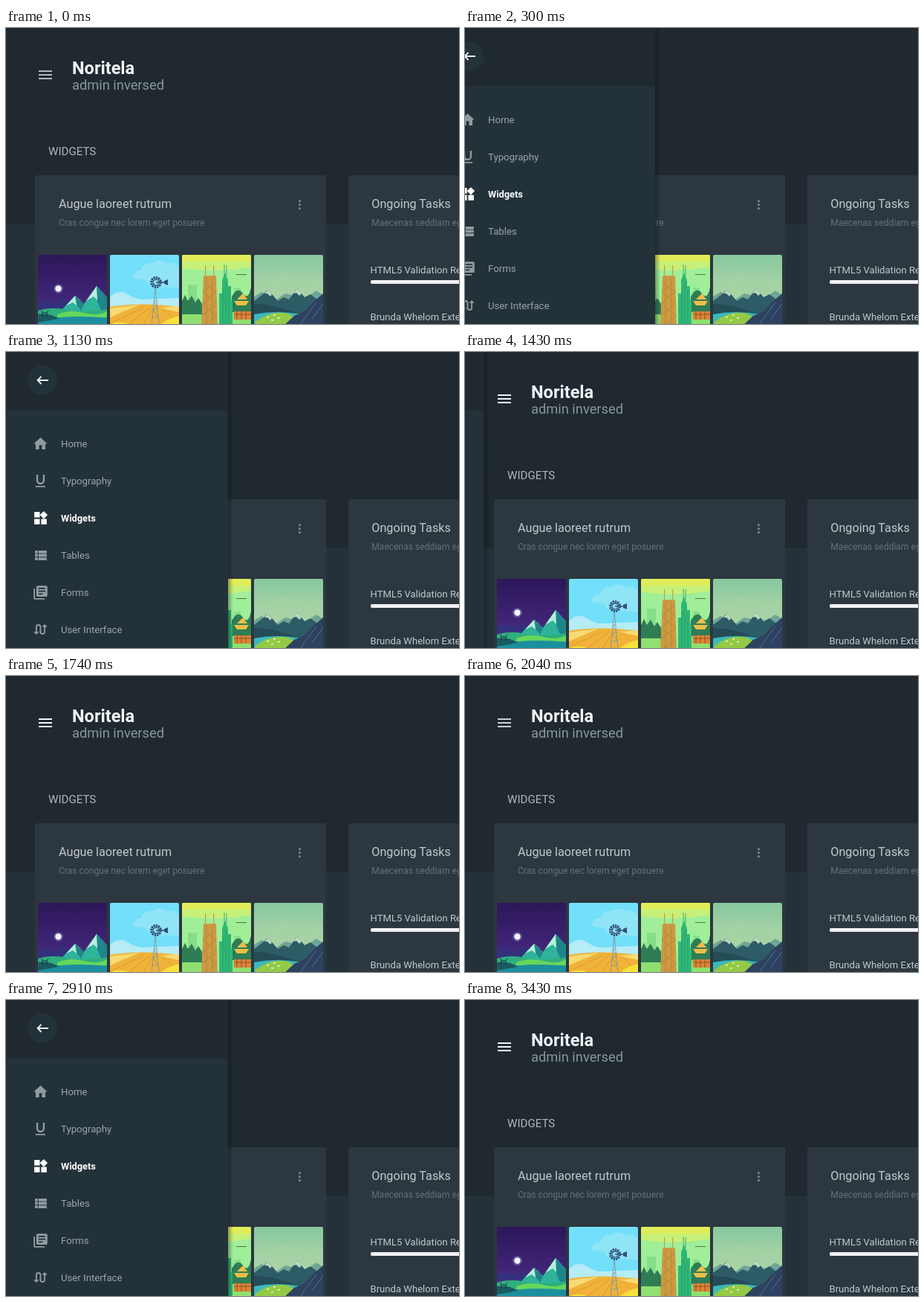
Recreate the animation shown at these times as an HTML page. Size 610 by 398 pixels, loop 3470 ms.

```html
<!DOCTYPE html>
<html lang="en">
<head>
<meta charset="utf-8">
<title>Sliding sidebar</title>
<style>
  html, body { margin: 0; width: 100%; height: 100%; overflow: hidden; background: #1f292f; }
  svg { display: block; }
  text { font-family: Roboto, sans-serif; fill: #c0c9ce; }
  .brand { font-size: 23.5px; font-weight: 700; fill: #f1f4f6; }
  .tag { font-size: 18.3px; fill: #89969d; }
  .section { font-size: 15.1px; fill: #aeb9be; }
  .title { font-size: 16.2px; }
  .sub { font-size: 12.1px; fill: #65727a; }
  .task { font-size: 13.1px; }
  .card { fill: #2c373f; }
  .item { fill: #8f9ca2; }
  .item text { font-size: 13.2px; fill: #9aa6ac; }
  .item.on, .item.on text { fill: #fff; }
  .item.on text { font-size: 12.8px; font-weight: 700; }
</style>
</head>
<body>
<svg width="610" height="398" viewBox="0 0 610 398">
  <defs>
    <clipPath id="tile"><rect width="93" height="100" rx="2"/></clipPath>
    <linearGradient id="night" x2="0" y2="1">
      <stop stop-color="#2c1759"/><stop offset=".55" stop-color="#3f2475"/><stop offset="1" stop-color="#5d3c8e"/>
    </linearGradient>
    <linearGradient id="dusk" x2="0" y2="1">
      <stop stop-color="#86c99f"/><stop offset=".6" stop-color="#b5d5a6"/>
    </linearGradient>
    <linearGradient id="shade">
      <stop stop-color="#0b1114" stop-opacity=".36"/><stop offset="1" stop-color="#0b1114" stop-opacity="0"/>
    </linearGradient>
  </defs>

  <rect width="610" height="398" fill="#1f292f"/>
  <rect y="263" width="610" height="135" fill="#243138"/>

  <path id="burger" transform="translate(41 51)" fill="#f3f6f7" d="M3 6h18v2H3zM3 11h18v2H3zM3 16h18v2H3z"/>
  <text class="brand" x="89" y="62">Noritela</text>
  <text class="tag" x="89" y="83">admin inversed</text>
  <text class="section" x="57" y="171">WIDGETS</text>

  <rect class="card" x="39" y="198" width="392" height="210" rx="2"/>
  <text class="title" x="71" y="242">Augue laoreet rutrum</text>
  <text class="sub" x="71" y="266">Cras congue nec lorem eget posuere</text>
  <g fill="#78848a">
    <circle cx="395.5" cy="232.7" r="1.6"/><circle cx="395.5" cy="237.7" r="1.6"/><circle cx="395.5" cy="242.7" r="1.6"/>
  </g>

  <!-- night mountains -->
  <g transform="translate(43 305)" clip-path="url(#tile)">
    <rect width="93" height="100" fill="url(#night)"/>
    <circle cx="27.5" cy="45.5" r="6.5" fill="#a99be0" opacity=".35"/>
    <circle cx="27.5" cy="45.5" r="4.2" fill="#eef6ff"/>
    <path fill="#35307e" d="M0 66L12 60 22 66 34 58 52 74H0z"/>
    <path fill="#2fb39a" d="M30 76L50 55 62 66 79 42 93 57V80H30z"/>
    <path fill="#b4f0d8" d="M50 55L38 68 47 64 52 68 57 61zM79 42L65 62 75 56 81 62 87 51z"/>
    <path fill="#1f8589" d="M79 42L93 57V78H86L80 62zM50 55L62 66 58 75 52 67z"/>
    <path fill="#2fae7c" d="M0 75Q18 69 38 74T93 73V90H0z"/>
    <path fill="#67d65c" d="M26 80Q44 73 62 78T93 76V84H26z"/>
    <path fill="#1c8f9e" d="M0 88Q44 80 93 85V100H0z"/>
    <path fill="#1a5a60" d="M0 80Q16 78 28 86L0 91z"/>
    <path stroke="#152e45" fill="none" d="M6 83V78H12V83M12 78L14 75M6 78L5 75"/>
  </g>

  <!-- windmill -->
  <g transform="translate(140 305)" clip-path="url(#tile)">
    <rect width="93" height="100" fill="#72dffb"/>
    <path fill="#a4e8f4" d="M30 31Q32 20 42 21 45 9 58 11 66 4 76 11 86 9 93 16V44H70Q50 44 48 34z" opacity=".6"/>
    <path fill="#b5ecf6" d="M0 57Q12 45 24 53T46 60L93 58V76H0z"/>
    <path fill="#f0b238" d="M0 70Q40 63 93 70V100H0z"/>
    <path fill="#f8da72" d="M0 72L40 67 0 84zM93 69L66 71 93 77z"/>
    <path stroke="#d9942e" stroke-width=".8" fill="none" d="M0 92L45 71M16 100L54 71M40 100L60 71M93 94L70 71"/>
    <path fill="#f6e03a" d="M62 100Q74 86 93 82V100zM0 93Q20 86 36 100H0z"/>
    <g stroke="#7f989c" stroke-width=".9" fill="none">
      <path d="M56 94L61 44 66 94M57 84H65M58 73L65 84M59 62L64 73M59 62H63M58 73H64"/>
    </g>
    <g stroke="#31517c" fill="none">
      <circle cx="62" cy="37" r="5.5" stroke-width="5" stroke-dasharray="2 .8"/>
      <path d="M62 37H75" stroke-width="1.5"/>
    </g>
    <path fill="#31517c" d="M73 35L78 33V41L73 39z"/>
  </g>

  <!-- city towers -->
  <g transform="translate(237 305)" clip-path="url(#tile)">
    <rect width="93" height="100" fill="#a0ef98"/>
    <path fill="#e0ec58" d="M0 0H93V9H0z"/>
    <path fill="#c6f078" d="M0 9H93V16Q50 24 0 18z"/>
    <path fill="#84e088" d="M8 40H20V100H8zM70 44H79V70H70z"/>
    <path fill="#2f7d55" d="M0 62L4 54 8 62 13 55 18 64 22 58 27 66V100H0zM67 56Q75 42 82 52T93 44V78H67z"/>
    <path fill="#8fe070" d="M0 80H27V100H0zM67 77H93V100H67z"/>
    <path fill="#cc9a42" d="M29 28H46L48 100H26zM31 14H32.2V29H31zM42 14H43.2V29H42z"/>
    <path stroke="#b07f38" stroke-width=".7" fill="none" d="M29 36L46 50 27 66 47 82 27 96M46 36L28 50 47 66 26 82M33 30V100M41 30V100"/>
    <path fill="#2fb877" d="M54 34L58 24 62 34V42H66V60H68V100H50V52H54z"/>
    <path stroke="#27996a" stroke-width=".8" fill="none" d="M57 13V28M60 14V28M55 44V100M59 38V100M63 46V100"/>
    <path stroke="#56703f" fill="none" d="M73 26.5H87"/>
    <path fill="#f0bd48" d="M74 60L82 52 88 60zM70 62H90L86 68H74z"/>
    <path fill="#dc8535" d="M70 76H93V87H70z"/>
    <path stroke="#904f2f" fill="none" d="M70 80H93M74 76V87M80 76V87M86 76V87"/>
  </g>

  <!-- lake valley -->
  <g transform="translate(334 305)" clip-path="url(#tile)">
    <rect width="93" height="100" fill="url(#dusk)"/>
    <path fill="#a3d3a5" d="M0 36Q12 26 24 32 34 18 48 27 60 20 68 32L93 27V56H0z" opacity=".65"/>
    <path fill="#6fa596" d="M0 56L10 50 30 60 42 52 70 58 84 48 93 54V80H0z"/>
    <path fill="#2e5c66" d="M0 62L8 56 19 47 32 62 40 57 47 60 58 45 68 57 76 53 93 66V84H0z"/>
    <path fill="#b9d8c2" d="M19 47L14 52 18 52 22 56 24 53zM58 45L53 52 57 51 61 55 64 52z"/>
    <path fill="#244c57" d="M0 66Q25 66 56 78V85H0z"/>
    <path fill="#3eb7bb" d="M0 80Q30 74 64 80V100H0z"/>
    <path fill="#93ca45" d="M2 90Q20 76 40 78T54 100H0z"/>
    <path fill="#f0f6d5" d="M17 83h3v1.5h-3zM26 80h3v1.5h-3zM32 84h3v1.5h-3zM23 87h3v1.5h-3z"/>
    <path fill="#2d4260" d="M93 52L79 64 68 76 54 82 38 97V100H93z"/>
    <path stroke="#557087" fill="none" d="M84 64L66 88 60 100M93 66L78 86"/>
  </g>

  <rect class="card" x="461" y="198" width="160" height="210" rx="2"/>
  <text class="title" x="492.3" y="242">Ongoing Tasks</text>
  <text class="sub" x="492.3" y="266">Maecenas seddiam eget</text>
  <text class="task" x="490.5" y="330">HTML5 Validation Report</text>
  <rect x="491" y="339" width="140" height="5" rx="2" fill="#f1eef5"/>
  <text class="task" x="490.5" y="393">Brunda Whelom Extension</text>

  <g id="drawer">
    <rect x="299" width="7" height="398" fill="url(#shade)"/>
    <rect x="-20" width="319" height="398" fill="#1f292f"/>
    <path fill="#233138" d="M-20 78H297Q299 78 299 80V398H-20z"/>
    <circle cx="49" cy="38" r="20" fill="#233138"/>
    <path d="M57 38H43M47.5 33L42.5 38 47.5 43" fill="none" stroke="#eef2f3" stroke-width="1.8"/>
    <g id="menu"></g>
  </g>
</svg>
<script>
const LOOP = 3470, SLIDE = 300, HIDDEN = -315;

const items = [
  ["Home", "M10 20v-6h4v6h5v-8h3L12 3 2 12h3v8z"],
  ["Typography", "M12 17c3.3 0 6-2.7 6-6V3h-2.5v8a3.5 3.5 0 0 1-7 0V3H6v8c0 3.3 2.7 6 6 6zm-7 2v2h14v-2z"],
  ["Widgets", "M13 13v8h8v-8zM3 21h8v-8H3zM3 3v8h8V3zm13.7-1.3L11 7.3l5.7 5.7 5.6-5.7z"],
  ["Tables", "M4 14h4v-4H4zm0 5h4v-4H4zM4 9h4V5H4zm5 5h12v-4H9zm0 5h12v-4H9zM9 5v4h12V5z"],
  ["Forms", "M4 6H2v14c0 1.1.9 2 2 2h14v-2H4zm16-4H8c-1.1 0-2 .9-2 2v12c0 1.1.9 2 2 2h12c1.1 0 2-.9 2-2V4c0-1.1-.9-2-2-2zm-1 9H9V9h10zm-4 4H9v-2h6zm4-8H9V5h10z"],
  ["User Interface", "M18 4l-4 4h3v7a2 2 0 0 1-4 0V8a4 4 0 0 0-8 0v7H2l4 4 4-4H7V8a2 2 0 0 1 4 0v7a4 4 0 0 0 8 0V8h3z"]
];

document.getElementById("menu").innerHTML = items.map(([label, icon], i) => `
  <g class="item${label === "Widgets" ? " on" : ""}" transform="translate(0 ${123.5 + i * 50})">
    <path transform="translate(35.3 -11.2) scale(.93)" d="${icon}"/>
    <text x="74" y="4.5">${label}</text>
  </g>`).join("");

// steps: [time, value, easing to the next step]
function play(id, prop, steps) {
  const frames = steps.map(([time, value, easing = "linear"]) =>
    ({ offset: time / LOOP, [prop]: value, easing }));
  document.getElementById(id).animate(frames, { duration: LOOP, iterations: Infinity });
}

const shut = `translate(${HIDDEN}px, 0px)`, open = "translate(0px, 0px)";
const slide = (start, from, to) => [[start, from, "ease"], [start + SLIDE, to]];

play("drawer", "transform", [
  [0, shut],
  ...slide(130, shut, open),
  ...slide(1258, open, shut),
  ...slide(2322, shut, open),
  ...slide(3010, open, shut),
  [LOOP, shut]
]);

const dim = 0.7;
play("burger", "opacity", [
  [0, dim], [50, dim], [130, 1],
  [1750, 1], [2220, dim],
  [2320, 1], [LOOP, 1]
]);
</script>
</body>
</html>
```
